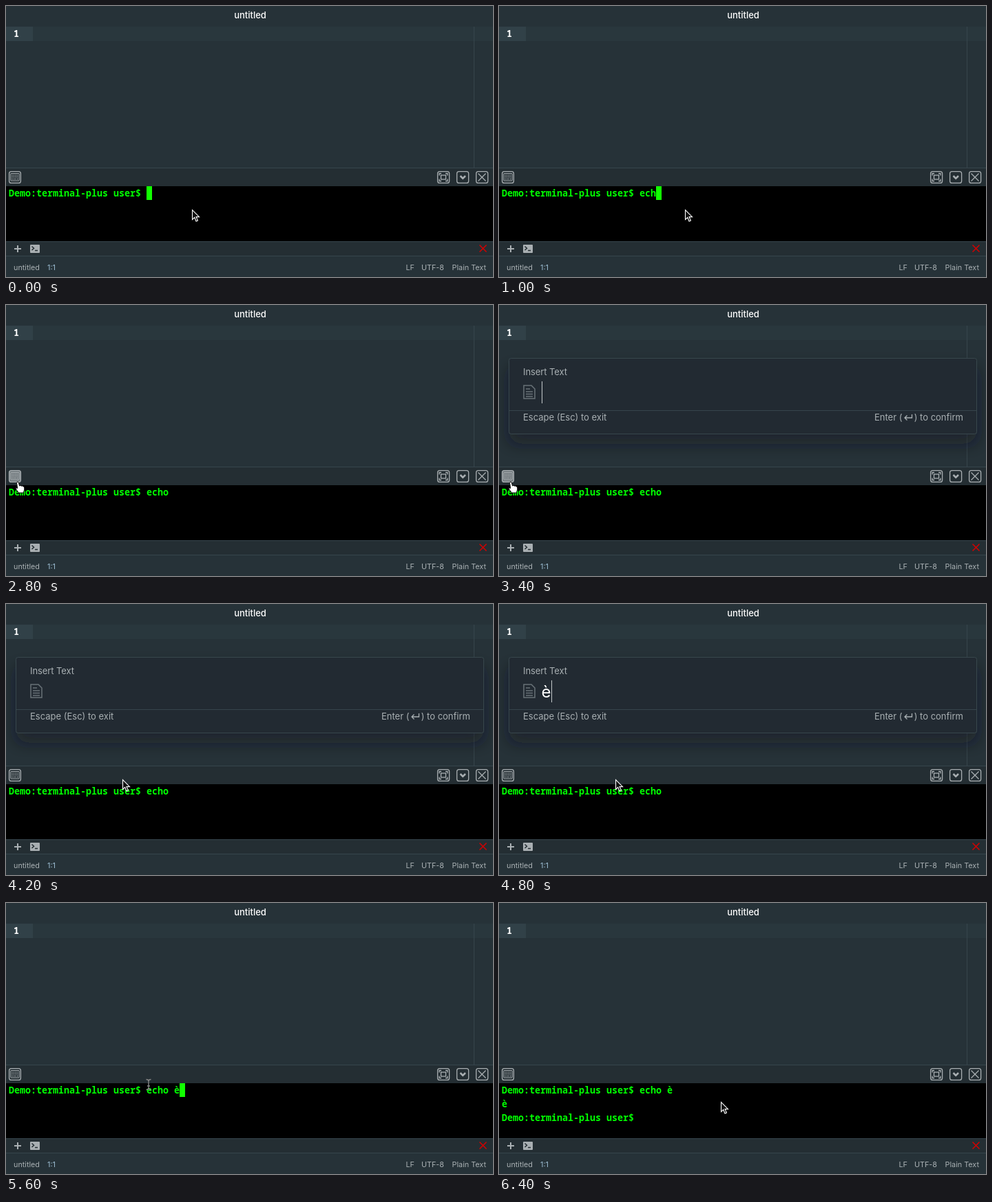
An HTML page that plays this animation: 707 px wide and 394 px high, repeating every 6.6 s.

```html
<!DOCTYPE html>
<html lang="en">
<head>
<meta charset="utf-8">
<title>Terminal panel</title>
<style>
  html, body { margin: 0; width: 100%; height: 100%; overflow: hidden; background: #263238; }
  svg { display: block; width: 707px; height: 394px; }
  text { white-space: pre; font: 13px Inter, sans-serif; fill: #a9b0b3; }
  .mono { font: 600 13.333px "Noto Sans Mono", monospace; }
  .term text { fill: #0f0; }
  .status text { font-size: 10.8px; }
  .end { text-anchor: end; }
  .line { fill: none; stroke: #36454c; }
  .icon { fill: none; stroke: #a9afb2; stroke-width: 1.3; }
</style>
</head>
<body>
<svg viewBox="0 0 707 394">
  <defs>
    <filter id="shadow" x="-10%" y="-40%" width="120%" height="200%">
      <feDropShadow dx="0" dy="14" stdDeviation="11" flood-color="#10181c" flood-opacity=".5"/>
    </filter>
  </defs>

  <!-- editor -->
  <rect width="707" height="394" fill="#263238"/>
  <text x="354.5" y="18" text-anchor="middle" font-weight="500" style="fill:#fff;font-weight:500">untitled</text>
  <rect y="30" width="707" height="21" fill="#29373d"/>
  <rect y="30" width="39" height="21" fill="#314148"/>
  <text class="mono" x="11" y="45" style="fill:#fff">1</text>
  <path class="line" d="M679.5 30V235"/>

  <!-- panel -->
  <rect y="235" width="707" height="128" fill="#242e33"/>
  <path class="line" d="M0 235.5H707M0 342.5H707M0 363.5H707"/>
  <rect y="262" width="707" height="80"/>
  <g class="icon">
    <rect id="keyboard" x="4.6" y="240.6" width="16.8" height="16.8" rx="3"/>
    <rect x="6.8" y="243.5" width="12.4" height="10.5" rx=".5" stroke-width="1"/>
    <path d="M8.5 245.8H18M8.5 248.5H18M8.5 251.5H10M11 251.5H15M16 251.5H18" stroke-width="1.3" stroke-dasharray="1.3 1"/>
    <rect x="626.6" y="240.6" width="17" height="16.8" rx="3"/>
    <rect x="631.5" y="246" width="7" height="6"/>
    <path d="M629 246.5V243.5H632M638 243.5H641V246.5M641 251.5V254.5H638M632 254.5H629V251.5"/>
    <rect x="654.6" y="240.6" width="17" height="16.8" rx="3"/>
    <path d="M659.5 247L663.2 250.7L667 247" stroke-width="2.5"/>
    <rect x="682.6" y="240.6" width="17" height="16.8" rx="3"/>
    <path d="M685.5 243.5L696.5 254.5M696.5 243.5L685.5 254.5"/>
    <path d="M12 353H22M17 348V358" stroke-width="2"/>
    <path d="M687.5 347.5L697.5 357.5M697.5 347.5L687.5 357.5" style="stroke:#d40000;stroke-width:1.5"/>
  </g>
  <rect x="35" y="347" width="14" height="12" rx="1" fill="#a9afb2"/>
  <path d="M37.5 349.5L40.5 352.3L37.5 355M42 355.5H46" fill="none" stroke="#242e33" stroke-width="1.5"/>

  <g class="term">
    <text class="mono" x="4" y="277"></text>
    <text class="mono" x="4" y="297"></text>
    <text class="mono" x="4" y="317"></text>
    <rect id="block" width="8" height="20" fill="#1f0"/>
  </g>

  <g class="status">
    <text x="11" y="384">untitled</text>
    <text x="60" y="384" style="fill:#9fc0d6">1:1</text>
    <text class="end" x="593" y="384">LF</text>
    <text class="end" x="636" y="384">UTF-8</text>
    <text class="end" x="697" y="384">Plain Text</text>
  </g>

  <g id="dialog">
    <rect x="14.5" y="77.5" width="679" height="110" rx="3" fill="#232c31" stroke="#37464d" filter="url(#shadow)"/>
    <path class="line" d="M15 153.5H693"/>
    <text x="35" y="102" letter-spacing="-.1">Insert Text</text>
    <path d="M36 117H47L52 122V136H36ZM39 122H45M39 126H49M39 129.5H49M39 133H49" fill="none" stroke="#687277" stroke-width="1.5"/>
    <text id="typed" x="61.5" y="136" style="font-size:24px;fill:#fff"></text>
    <path id="caret" d="M.5 111V143" stroke="#c3c8ca"/>
    <text x="35" y="168">Escape (Esc) to exit</text>
    <text x="545" y="168">Enter (</text>
    <path d="M599.5 159V164H589M592.5 160.5L589 164L592.5 167.5" fill="none" stroke="#a9b0b3" stroke-width="1.3"/>
    <text class="end" x="674" y="168">) to confirm</text>
  </g>

  <g id="pointer">
    <path id="arrow" d="M.5 .5V14.5L3.7 11.5L6 17L8.4 16L6.1 10.6H10.5Z" fill="#111" stroke="#fff" stroke-width="1.1"/>
    <path id="beam" d="M-3.5 -7.5Q0 -7.5 0 -5V5Q0 7.5 -3.5 7.5M3.5 -7.5Q0 -7.5 0 -5V5Q0 7.5 3.5 7.5M-2 2H2" fill="none" stroke="#858585" stroke-width="1.4"/>
    <path id="hand" d="M-1.5 0Q0 -1.5 1.3 0L2.5 5L4 4.3L5.5 5.3L7 4.8L8 6L9.5 6.3L9.8 10L8.3 15H1.5L-3 9Q-3 7 -.3 8.5Z" fill="#fff" stroke="#111"/>
  </g>
</svg>

<script>
const LOOP = 6600, STEP = 200;
const PROMPT = 'Demo:terminal-plus user$ ';
const OPEN = 3000, ACCENT = 4800, CONFIRM = 5600, RUN = 5800;
const path = [ // time, x, y
  [0, 270, 296], [1400, 270, 296], [2000, 150, 272], [2600, 17, 258],
  [3600, 17, 258], [4000, 169, 255], [5400, 169, 255], [6200, 322, 289], [LOOP, 322, 289]
];
const $ = id => document.getElementById(id);
const rows = document.querySelectorAll('.term text');
const show = (id, on) => $(id).style.display = on ? '' : 'none';
const within = (t, a, b) => t >= a && t < b;

function pointerAt(t) {
  const i = path.findIndex(p => p[0] > t);
  const [t0, x0, y0] = path[i - 1], [t1, x1, y1] = path[i];
  const k = (t - t0) / (t1 - t0);
  return [x0 + (x1 - x0) * k, y0 + (y1 - y0) * k];
}

function terminalLines(t) {
  const typed = 'echo '.slice(0, Math.max(0, Math.floor((t - 400) / 200)));
  if (t < CONFIRM) return [PROMPT + typed];
  return t < RUN ? [PROMPT + 'echo è'] : [PROMPT + 'echo è', 'è', PROMPT];
}

function draw(t) {
  const lines = terminalLines(t), last = lines.length - 1;
  rows.forEach((row, i) => row.textContent = lines[i] || '');
  $('block').setAttribute('x', 4 + 8 * lines[last].length);
  $('block').setAttribute('y', 262 + 20 * last);
  show('block', t < 1600 || within(t, 2000, 2600) || within(t, CONFIRM, 6200));

  const accent = t >= ACCENT;
  show('dialog', within(t, OPEN, CONFIRM));
  $('typed').textContent = accent ? 'è' : '';
  $('caret').setAttribute('transform', `translate(${accent ? 76 : 62})`);
  show('caret', Math.floor((t - OPEN - 100) / 600) % 2 === 0);

  const [x, y] = pointerAt(t);
  const hover = x < 23, overText = !hover && y > 262 && y < 282 && x < 240;
  $('pointer').setAttribute('transform', `translate(${Math.round(x)} ${Math.round(y)})`);
  show('hand', hover);
  show('beam', overText);
  show('arrow', !hover && !overText);
  $('keyboard').style.fill = hover ? '#727a7e' : 'none';
}

const start = performance.now();
function tick() {
  const t = (performance.now() - start) % LOOP;
  draw(Math.floor(t / STEP) * STEP);
  requestAnimationFrame(tick);
}
tick();
</script>
</body>
</html>
```
